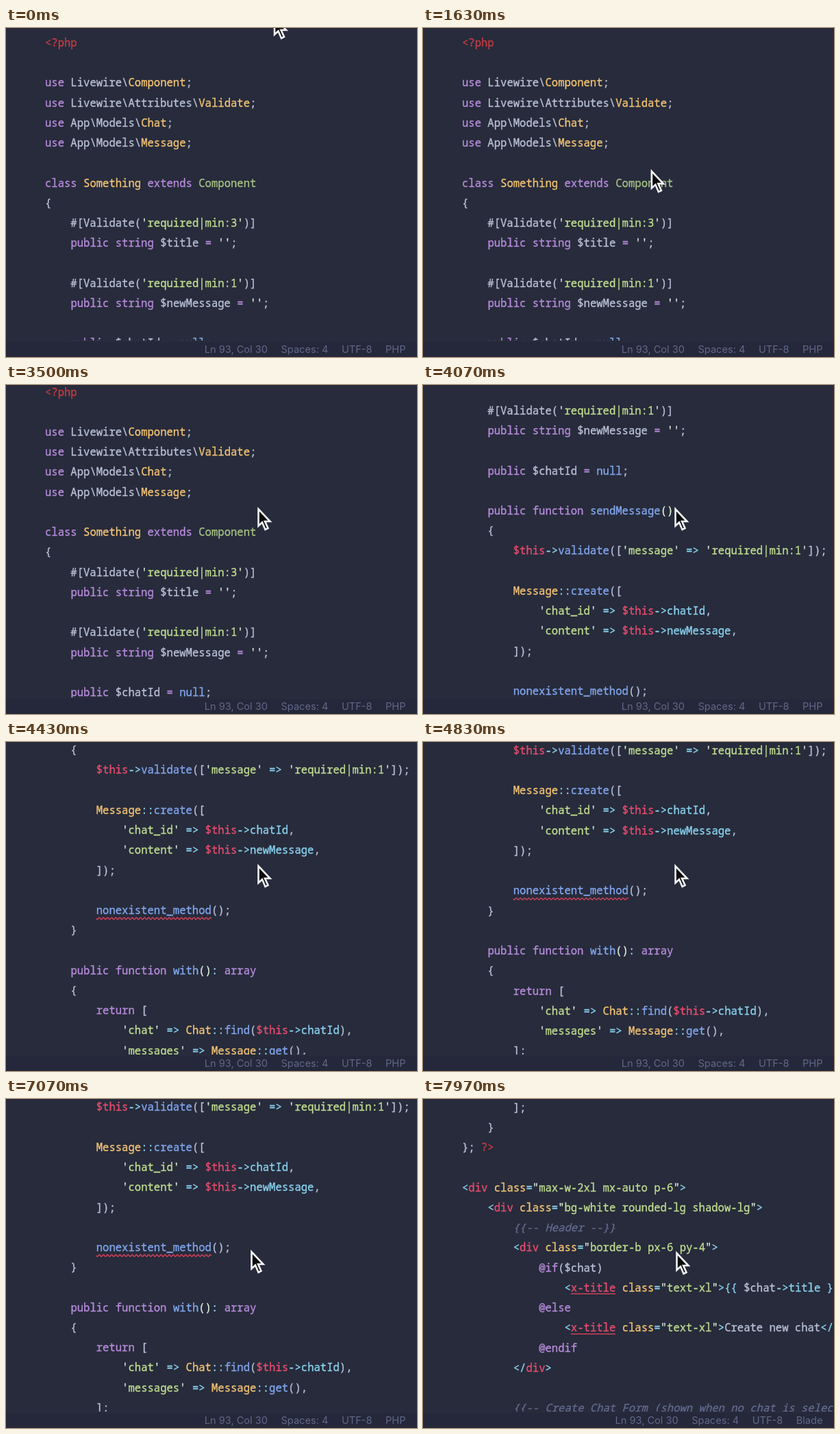
Recreate the animation shown at these times as an HTML page with a canvas. Size 600 px wide and 480 px high, loop 8000 ms.

```html
<!DOCTYPE html>
<html lang="en">
<head>
<meta charset="utf-8">
<title>Editor hover preview</title>
<style>
  html, body { margin: 0; height: 100%; overflow: hidden; background: #272b3b; }
  canvas { display: block; }
</style>
</head>
<body>
<canvas id="stage" width="600" height="480"></canvas>
<script>
const ctx = document.getElementById('stage').getContext('2d');
const LOOP = 8000, CHAR = 9.345, LINE = 29.23, LEFT = 57;
const MONO = '15.57px "Noto Sans Mono", "DejaVu Sans Mono", monospace';
const SANS = '14.6px Inter, "Liberation Sans", sans-serif';

const COLORS = {
  w: '#b9c0d6', // plain
  k: '#b78bdc', // keyword
  y: '#f2c374', // class or attribute
  s: '#bfdc8f', // string
  q: '#dcefdf', // quote
  f: '#82a6ee', // function
  c: '#8ad2f0', // operator or property
  r: '#e64c6e', // tag or $this
  p: '#c23c42', // php tag
  g: '#a6c284', // parent class
  i: '#636a90', // comment
};

// "~x" switches to colour x; strings, operators and $this are marked automatically.
const parse = source => source.trim().split('\n').map(line => line
  .replace(/(['"])(.*?)\1/g, '~q$1~s$2~q$1~w')
  .replace(/->|=>|::/g, '~c$&~w')
  .replace(/\$this/g, '~r$&~w')
  .split(/~(.)/));

const editorLines = parse(String.raw`
~p<?php

~kuse~w Livewire\~yComponent~w;
~kuse~w Livewire\Attributes\~yValidate~w;
~kuse~w App\Models\~yChat~w;
~kuse~w App\Models\~yMessage~w;

~kclass ~ySomething ~kextends ~gComponent
{
    #[Validate('required|min:3')]
    ~kpublic string~w $title ~k=~w '';

    #[Validate('required|min:1')]
    ~kpublic string~w $newMessage ~k=~w '';

    ~kpublic~w $chatId ~k=~f null~w;

    ~kpublic function ~fsendMessage~q()
    {
        $this->~fvalidate~w(['message' => 'required|min:1']);

        ~yMessage::~fcreate~w([
            'chat_id' => $this->~cchatId~w,
            'content' => $this->~cnewMessage~w,
        ]);

        ~fnonexistent_method~w();
    }

    ~kpublic function ~fwith~q()~c: ~karray
    {
        ~kreturn~w [
            'chat' => ~yChat::~ffind~w($this->~cchatId~w),
            'messages' => ~yMessage::~fget~w(),
        ];
    }
}; ~p?>

~c<~rdiv ~yclass~c="max-w-2xl mx-auto p-6"~c>
    ~c<~rdiv ~yclass~c="bg-white rounded-lg shadow-lg"~c>
        ~i{{-- Header --}}
        ~c<~rdiv ~yclass~c="border-b px-6 py-4"~c>
            ~k@if~w($chat)
                ~c<~rx-title ~yclass~c="text-xl"~c>{{~w $chat->~ctitle }}</~rx-title~c>
            ~k@else
                ~c<~rx-title ~yclass~c="text-xl"~c>~wCreate new chat~c</~rx-title~c>
            ~k@endif
        ~c</~rdiv~c>

        ~i{{-- Create Chat Form (shown when no chat is selected) --}}
`);

const popupLines = parse(`
~p<?php
~kabstract class ~yComponent
{
    ~kuse ~yMacroable~w,
        ~yAuthorizesRequests~w,
        ~yInteractsWithProperties~w,
        ~yHandlesEvents~w,
`);

// Each track holds [time, ...values], eased between neighbours.
const cursorTrack = [
  [0, 390.5, -18], [1900, 329, 219], [3050, 329, 219], [3450, 367, 178],
  [5000, 367, 178], [5700, 357, 220], [7130, 357, 220], [7500, 369, 222],
];
const scrollTrack = [[0, 0], [3400, 0], [4592, 564], [5000, 565], [7130, 565], [8000, 1004.5]];

function sample(track, time) {
  const next = track.findIndex(key => key[0] > time);
  if (next < 0) return track[track.length - 1].slice(1);
  const from = track[next - 1], to = track[next];
  const p = (time - from[0]) / (to[0] - from[0]);
  const eased = p * p * (3 - 2 * p);
  return from.slice(1).map((v, i) => v + (to[i + 1] - v) * eased);
}

// A thin outline gives the code its medium weight.
function drawLine(parts, x, y) {
  ctx.lineWidth = 0.35;
  let column = 0;
  for (let i = 0; i < parts.length; i += 2) {
    const color = i ? parts[i - 1] : 'w';
    ctx.font = (color === 'i' ? 'italic ' : '') + MONO;
    ctx.fillStyle = ctx.strokeStyle = COLORS[color];
    ctx.fillText(parts[i], x + column * CHAR, y);
    ctx.strokeText(parts[i], x + column * CHAR, y);
    column += parts[i].length;
  }
}

function drawUnderline(column, length, y, wave) {
  const start = LEFT + column * CHAR, end = start + length * CHAR;
  ctx.beginPath();
  for (let x = start; x <= end; x++) {
    ctx.lineTo(x, y + wave * Math.sin((x - start) * Math.PI / 3));
  }
  ctx.strokeStyle = '#cf4058';
  ctx.lineWidth = 1.5;
  ctx.stroke();
}

function drawEditor(scroll, hovered) {
  const baseline = row => 27 + row * LINE - scroll;
  ctx.save();
  ctx.beginPath();
  ctx.rect(0, 0, 600, 456);
  ctx.clip();
  if (hovered) {
    ctx.fillStyle = '#463679';
    ctx.fillRect(281, 211, 84, 29);
  }
  editorLines.forEach((parts, row) => {
    const y = baseline(row);
    if (y > -10 && y < 480) drawLine(parts, LEFT, y);
  });
  drawUnderline(8, 18, baseline(26) + 6.5, 1.4);
  drawUnderline(17, 7, baseline(43) + 3.5, 0);
  drawUnderline(17, 7, baseline(45) + 3.5, 0);
  ctx.restore();
}

function drawStatus(language) {
  ctx.fillStyle = '#24283a';
  ctx.fillRect(0, 458, 600, 22);
  ctx.font = SANS;
  ctx.fillStyle = '#62688a';
  let x = 583.5;
  for (const label of [language, 'UTF-8', 'Spaces: 4', 'Ln 93, Col 30']) {
    x -= ctx.measureText(label).width;
    ctx.fillText(label, x, 474);
    x -= 19.5;
  }
}

function drawPopup() {
  ctx.fillStyle = '#25293a';
  ctx.strokeStyle = '#7352b0';
  ctx.lineWidth = 1.5;
  ctx.beginPath();
  ctx.roundRect(186, 240.5, 397, 260, 2);
  ctx.fill();
  ctx.stroke();
  ctx.fillStyle = '#432f78';
  ctx.fillRect(570, 241.5, 12.5, 146);
  ctx.font = 'bold ' + SANS;
  ctx.fillStyle = '#fff';
  ctx.fillText('Livewire\\Component', 196, 266);
  popupLines.forEach((parts, row) => drawLine(parts, 196, 305.5 + row * LINE));
}

function drawCursor(x, y) {
  ctx.save();
  ctx.translate(x, y);
  ctx.beginPath();
  [[1.5, 3], [1.5, 27.5], [7, 22.5], [11.5, 33], [15.5, 31], [11, 21], [18.5, 21]]
    .forEach(point => ctx.lineTo(...point));
  ctx.closePath();
  ctx.lineWidth = 2.6;
  ctx.strokeStyle = '#f4f4f6';
  ctx.fillStyle = '#0b0b0d';
  ctx.fill();
  ctx.stroke();
  ctx.restore();
}

function draw(time) {
  const [scroll] = sample(scrollTrack, time);
  const open = time >= 1950 && time < 3150;
  ctx.fillStyle = '#272b3b';
  ctx.fillRect(0, 0, 600, 480);
  drawEditor(scroll, open);
  drawStatus(scroll > 800 ? 'Blade' : 'PHP');
  if (open) drawPopup();
  drawCursor(...sample(cursorTrack, time));
}

const start = performance.now();
function tick() {
  draw((performance.now() - start) % LOOP);
  requestAnimationFrame(tick);
}
tick();
</script>
</body>
</html>
```
